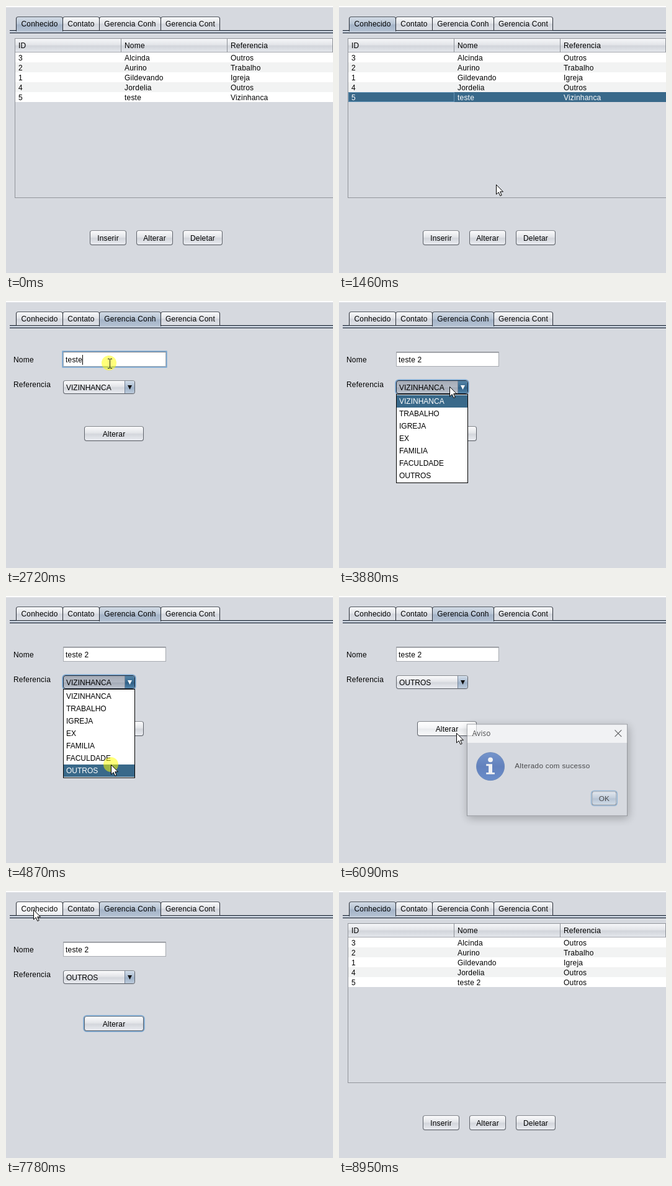
Recreate the animation shown at these times as an HTML page. Size 527x431 px, loop 9500 ms.

```html
<!DOCTYPE html>
<html lang="pt">
<head>
<meta charset="utf-8">
<title>Cadastro</title>
<style>
html, body { margin: 0; width: 100%; height: 100%; overflow: hidden; background: #d6d9df; }
#stage { position: absolute; left: 0; top: 0; width: 527px; height: 431px; overflow: hidden; background: #d6d9df;
  font: 12px/16px "Liberation Sans", Arial, sans-serif; letter-spacing: .2px; color: #000; cursor: default; }
#stage div, #stage svg { position: absolute; box-sizing: border-box; white-space: pre; }
#stage svg { overflow: visible; }
.layer { left: 0; top: 0; width: 527px; height: 431px; }
.btn { border: 1px solid #5f636b; border-top-color: #85898f; border-radius: 4px; text-align: center;
  background: linear-gradient(#fbfbfc, #e3e5e9 45%, #d3d6dc 55%, #eaecf1); box-shadow: 0 1px 0 #c3c6cc; }
.btn.hover { background: linear-gradient(#fff, #f4f5f7 45%, #e9ebee 55%, #fafbfc); }
.btn.down { background: linear-gradient(#a9afb9, #b7bcc6 50%, #a8aeb9 55%, #c3c8d1); }
#stage .ring { box-shadow: 0 0 0 1.6px #73a4d1; }
.tab { top: 17px; height: 23px; border: 1px solid #282d36; border-top-color: #50565f; border-radius: 4px 4px 0 0;
  text-align: center; line-height: 22px; background: linear-gradient(#f8f9fa, #e4e6ea 45%, #d3d6dd 55%, #dfe2e8); }
.tab.hover { background: linear-gradient(#fff, #f6f7f9 50%, #eceef2); }
.tab.on { height: 24px; border-bottom: 0; background: linear-gradient(#d3dbe5, #b9c6d6 45%, #a5b4c8 55%, #b4c2d3); }
.head { top: 53px; height: 22px; line-height: 23px; padding-left: 5px; border-right: 1px solid #8d9197;
  border-bottom: 1px solid #a5a8ae; background: linear-gradient(#f6f7f9, #e3e5e9 45%, #d2d5db 55%, #e4e7ec); }
.row { left: 15px; width: 512px; height: 16px; }
.row.sel { background: #39698a !important; color: #fff; }
.row.sel .focus { border: 1px solid #6495b8; }
.focus { left: 0; top: 0; width: 171px; height: 16px; }
.field { border: 1px solid #a9acb2; border-top-color: #7f8288; background: #fff; box-shadow: inset 0 1px 1px #c4c6ca; }
.combo { text-align: left; letter-spacing: 0; overflow: hidden; }
.combo .arrow { right: 0; top: 0; width: 16px; height: 20px; border-left: 1px solid #77869a;
  background: linear-gradient(#d2dde9, #a9bbd0 50%, #9db1c8 55%, #bdccdc); }
.combo.open { border-color: #1e2836; background: linear-gradient(#a4aab5, #b3b9c4 50%, #a3aab6 55%, #bdc3cd); }
.combo.open .arrow { background: linear-gradient(#5484a8, #38698d 50%, #2f6087 55%, #5485aa); }
.item { left: 0; width: 114px; height: 20px; line-height: 20px; padding-left: 4px; letter-spacing: 0; }
.item.sel { background: #39698a; color: #fff; }
#dialog { left: 203px; top: 205px; width: 265px; height: 152px; border: 1px solid #6c6f75; background: #d6d9df;
  box-shadow: 2px 4px 14px rgba(0,0,0,.4); }
#dot { width: 24px; height: 24px; margin: -12px; border-radius: 50%; background: rgba(255,255,0,.52); }
</style>
</head>
<body>
<div id="stage"></div>
<script>
const LOOP = 9500;
const stage = document.getElementById('stage');

function box(parent, cls, x, y, w, h, text) {
  const d = document.createElement('div');
  d.className = cls;
  const pos = { left: x, top: y, width: w, height: h };
  for (const k in pos) if (pos[k] != null) d.style[k] = pos[k] + 'px';
  if (text) d.textContent = text;
  parent.appendChild(d);
  return d;
}
const label = (parent, x, midY, text) => box(parent, '', x, midY - 8, null, 16, text);
function button(parent, x, y, w, h, text) {
  const b = box(parent, 'btn', x, y, w, h, text);
  b.style.lineHeight = h + 'px';
  return b;
}
function fill(parent, x, y, w, h, color) {
  const d = box(parent, '', x, y, w, h);
  d.style.background = color;
  return d;
}
function svg(parent, x, y, w, h, inner) {
  const d = box(parent, '', x, y, w, h);
  d.innerHTML = `<svg width="${w}" height="${h}" viewBox="0 0 ${w} ${h}">${inner}</svg>`;
  return d;
}

// Tab bar
fill(stage, 0, 0, 527, 2, '#fff');
fill(stage, 6, 39, 521, 5, '#c3ccd8').style.cssText += ';border:solid #0d1828;border-width:1px 0';
const tabs = [['Conhecido', 16, 76], ['Contato', 91, 60], ['Gerencia Conh', 150, 100], ['Gerencia Cont', 249, 96]]
  .map(([s, x, w]) => box(stage, 'tab', x, null, w, null, s));

// Table page
const list = box(stage, 'layer');
fill(list, 14, 52, 520, 258, '#d6d9df').style.border = '1px solid #92959b';
[['ID', 15], ['Nome', 186], ['Referencia', 357]]
  .forEach(([s, x]) => box(list, 'head', x, null, x < 357 ? 171 : 170, null, s));
const rows = [['3', 'Alcinda', 'Outros'], ['2', 'Aurino', 'Trabalho'], ['1', 'Gildevando', 'Igreja'],
  ['4', 'Jordelia', 'Outros'], ['5', 'teste', 'Vizinhanca']].map((cells, i) => {
  const r = box(list, 'row', null, 75 + i * 16);
  r.style.background = i % 2 ? '#f2f3f3' : '#fff';
  box(r, 'focus');
  return { el: r, cells: cells.map((s, j) => label(r, [5, 176, 347][j], 9, s)) };
});
const last = rows[4];
button(list, 135, 362, 59, 24, 'Inserir');
const editBtn = button(list, 210, 362, 59, 24, 'Alterar');
button(list, 285, 362, 64, 24, 'Deletar');

// Form page
const form = box(stage, 'layer');
label(form, 12, 95, 'Nome');
label(form, 12, 135, 'Referencia');
const field = box(form, 'field', 92, 82, 166, 24);
const nameText = label(field, 3, 12, 'teste');
const caret = fill(field, 30, 4, 1, 16, '#000');
const saveBtn = button(form, 126, 202, 96, 24, 'Alterar');
const combo = box(form, 'btn combo', 92, 128, 116, 22);
const comboText = label(combo, 4, 11, 'VIZINHANCA');
const arrow = box(combo, 'arrow');
const tip = svg(arrow, 4, 7, 7, 7, '<path d="M0 0H7L3.5 7Z" fill="currentColor"/>');
const popup = fill(form, 92, 150, 116, 144, '#fff');
popup.style.border = '1px solid #000';
const items = ['VIZINHANCA', 'TRABALHO', 'IGREJA', 'EX', 'FAMILIA', 'FACULDADE', 'OUTROS']
  .map((s, i) => box(popup, 'item', null, 1 + i * 20, null, null, s));

// Message box
const dialog = box(stage, '');
dialog.id = 'dialog';
fill(dialog, 0, 0, 263, 30, '#fff');
label(dialog, 8, 15, 'Aviso').style.fontFamily = '"Open Sans", sans-serif';
svg(dialog, 243, 9, 11, 11, '<path d="M0 0L11 11M11 0L0 11" stroke="#222" stroke-width="1.2"/>');
svg(dialog, 14, 45, 48, 48, `<defs><linearGradient id="g" x2="0" y2="1">
  <stop stop-color="#4271c2"/><stop offset=".5" stop-color="#2855ac"/><stop offset="1" stop-color="#3266c0"/></linearGradient></defs>
  <circle cx="24" cy="24" r="23" fill="url(#g)" stroke="#3560a8"/>
  <circle cx="24" cy="13" r="4" fill="#fff"/>
  <path d="M17 20H27V34H31V37H17V34H21V23H17Z" fill="#fff"/>`);
label(dialog, 78, 68, 'Alterado com sucesso').style.letterSpacing = '.3px';
const okBtn = button(dialog, 205, 110, 41, 23, 'OK');
okBtn.style.background = 'linear-gradient(#e9eff6, #bccbdc 45%, #a8bbd0 55%, #d0deec)';
okBtn.classList.add('ring');

// Pointer
const dot = box(stage, '');
dot.id = 'dot';
const pointer = svg(stage, 0, 0, 12, 19,
  '<path d="M.5 .5V16L4.2 12.7 6.8 18.5 9.2 17.4 6.7 11.8H11.5Z" fill="#fff" stroke="#000"/>');
const beam = svg(stage, 0, 0, 9, 16,
  '<path d="M1 .5H4M5 .5H8M4.5 1V15M1 15.5H4M5 15.5H8" fill="none" stroke="#222"/>');

const ease = {
  lin: p => p,
  in: p => p * p,
  out: p => 1 - (1 - p) ** 2,
  both: p => p * p * (3 - 2 * p)
};
// time, x, y, easing on the way there
const path = [
  [120, 462, 418], [680, 161, 145, 'both'], [849, 161, 145], [850, 160, 144], [1300, 160, 144],
  [1460, 253, 288, 'lin'], [1660, 240, 368, 'out'], [1940, 240, 368], [2230, 205, 207, 'in'],
  [2550, 166, 100, 'out'], [3220, 166, 100], [3580, 178, 138, 'both'], [3860, 178, 138],
  [4120, 172, 254, 'lin'], [4410, 169, 272, 'out'], [5020, 169, 272], [5420, 189, 221, 'both'],
  [6200, 189, 221], [6630, 427, 326, 'both'], [7060, 427, 326], [7580, 80, 2, 'both'],
  [7780, 44, 30, 'out'], [8030, 44, 30], [8790, 402, 346, 'in'], [8950, 466, 431, 'lin']
];
const clicks = [[1100, 1300], [1780, 1930], [2680, 2850], [3680, 3820],
  [4870, 5000], [5840, 6010], [6880, 7010], [7860, 8000]];

function place(t) {
  let i = 1;
  while (i < path.length - 1 && t >= path[i][0]) i++;
  const [t0, x0, y0] = path[i - 1], [t1, x1, y1, e = 'lin'] = path[i];
  const step = t0 + Math.floor((t - t0) / 40) * 40;
  const p = ease[e](Math.min(1, Math.max(0, (step - t0) / (t1 - t0))));
  return [Math.round(x0 + (x1 - x0) * p), Math.round(y0 + (y1 - y0) * p)];
}
const show = (el, on) => { el.style.display = on ? '' : 'none'; };
const mark = (el, cls, on) => el.classList.toggle(cls, on);
const move = (el, x, y) => { el.style.left = x + 'px'; el.style.top = y + 'px'; };

function render(t) {
  const during = (a, b) => t >= a && t < b;
  const [x, y] = place(t);
  const over = (l, u, r, b) => x >= l && x < r && y >= u && y < b;
  const seen = during(120, 8950);
  const press = clicks.some(([a, b]) => during(a, b));
  const inForm = during(1930, 8000);

  show(list, !inForm);
  show(form, inForm);
  tabs.forEach((tab, i) => mark(tab, 'on', i === (inForm ? 2 : 0)));
  mark(tabs[0], 'hover', inForm && t > 7000 && over(16, 17, 91, 40));

  mark(last.el, 'sel', during(1140, 1930));
  const saved = t >= 1930;
  last.cells[1].textContent = saved ? 'teste 2' : 'teste';
  last.cells[2].textContent = saved ? 'Outros' : 'Vizinhanca';
  const onEdit = seen && !inForm && over(210, 362, 269, 386);
  mark(editBtn, 'hover', onEdit);
  mark(editBtn, 'down', onEdit && press);

  const typing = during(2680, 3680);
  mark(field, 'ring', typing);
  nameText.textContent = t < 3010 ? 'teste' : t < 3180 ? 'teste ' : 'teste 2';
  show(caret, typing);
  caret.style.left = 3 + nameText.offsetWidth + 'px';

  const open = during(3820, 5000);
  mark(combo, 'ring', during(3680, 5840));
  mark(combo, 'open', during(3680, 5000));
  tip.style.color = during(3680, 5000) ? '#fff' : '#111';
  comboText.textContent = t < 5000 ? 'VIZINHANCA' : 'OUTROS';
  show(popup, open);
  const hit = Math.max(0, Math.min(6, Math.floor((y - 152) / 20)));
  items.forEach((el, i) => mark(el, 'sel', i === hit));

  mark(saveBtn, 'hover', during(5020, 6880) && over(126, 202, 222, 226));
  mark(saveBtn, 'down', during(5840, 6010));
  mark(saveBtn, 'ring', during(5840, 6010) || during(7010, 8000));

  show(dialog, during(6010, 7170));
  const closing = t >= 7010;
  const k = ease.out(Math.min(1, Math.max(0, (closing ? 7170 - t : t - 6010) / 160)));
  dialog.style.opacity = k ** 1.5;
  dialog.style.transform = k < 1 ? `scale(${0.91 + 0.09 * k})` : 'none';

  const text = inForm && over(92, 82, 258, 106) && t < 4000;
  show(dot, press);
  move(dot, x, y);
  show(pointer, seen && !text);
  move(pointer, x, y);
  show(beam, text && !during(3010, 3220));
  move(beam, x - 3, y - 7);
}

const start = performance.now();
function tick() {
  render((performance.now() - start) % LOOP);
  requestAnimationFrame(tick);
}
tick();
</script>
</body>
</html>
```
